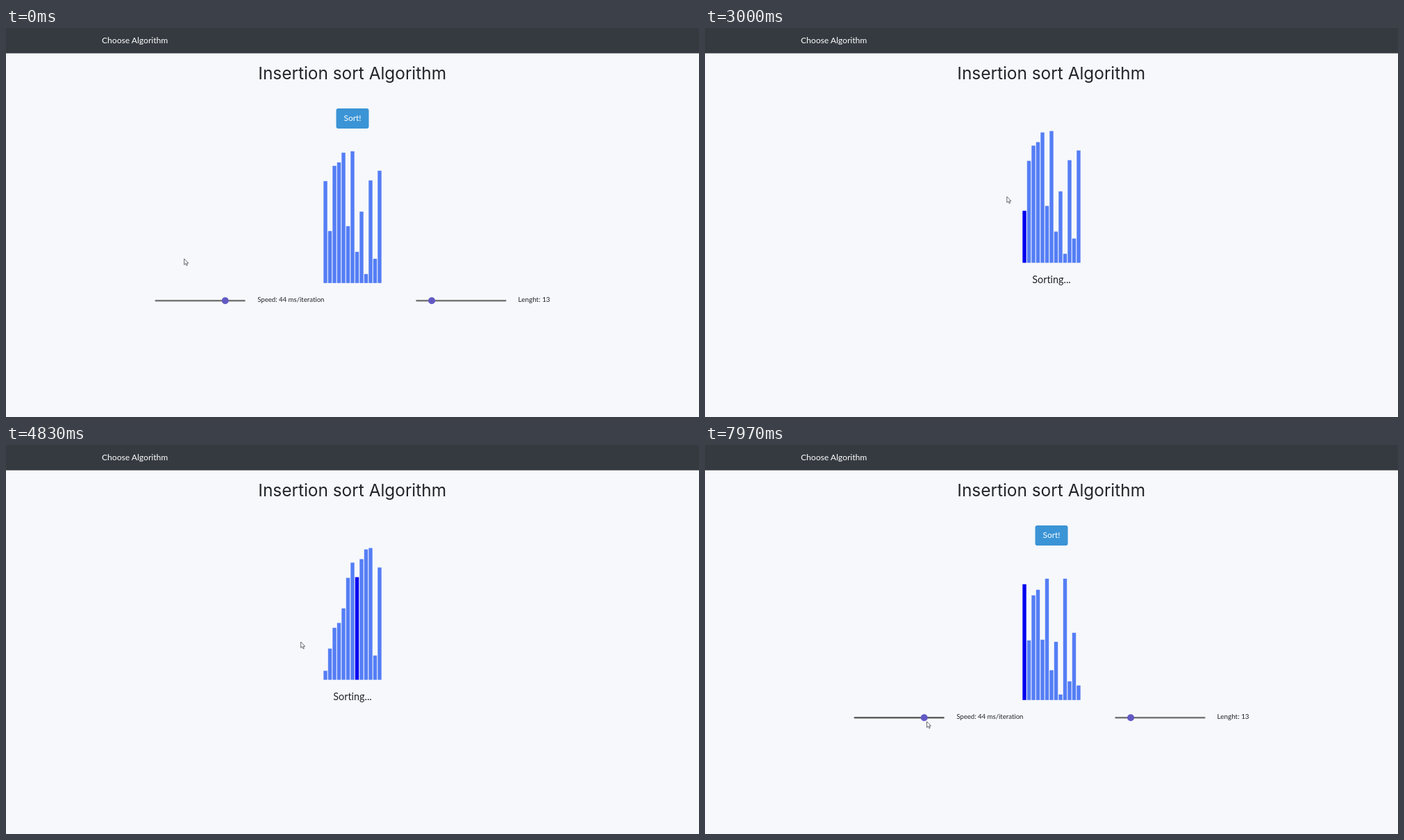
An HTML page that plays this animation: 998x561 px, repeating every 8000 ms.

```html
<!DOCTYPE html>
<html lang="en">
<head>
<meta charset="utf-8">
<title>Insertion sort</title>
<style>
  html, body { margin: 0; width: 100%; height: 100%; overflow: hidden; background: #f6f8fb; }
  svg { display: block; width: 998px; height: 561px; }
  text { font-family: Lato, "Open Sans", sans-serif; font-variant-ligatures: none; fill: #212529; }
  .title { font-family: Inter, "Open Sans", sans-serif; font-size: 24.4px; }
  .mid { text-anchor: middle; }
  .light { fill: #fff; }
</style>
</head>
<body>
<svg viewBox="0 0 998 561">
  <defs>
    <g id="slider">
      <rect y="-1.2" width="130.2" height="2.4" rx="1"/>
    </g>
    <circle id="thumb" r="5" fill="#6259c4"/>
  </defs>
  <rect width="998" height="36.5" fill="#343a40"/>
  <text class="light" x="138" y="22" font-size="12.1">Choose Algorithm</text>
  <text class="title mid" x="498.7" y="73.7">Insertion sort Algorithm</text>
  <g id="bars"></g>
  <g id="setup">
    <rect id="sortBtn" x="475.5" y="116" width="47" height="29" rx="3"/>
    <text class="mid light" x="499" y="134.2" font-size="11.9">Sort!</text>
    <use id="speed" href="#slider" x="214.5" y="393.3"/>
    <use href="#thumb" x="315.7" y="393.3"/>
    <text x="362.2" y="394.5" font-size="9.6">Speed: 44 ms/iteration</text>
    <use href="#slider" x="590.3" y="393.3" fill="#777"/>
    <use href="#thumb" x="613.1" y="393.3"/>
    <text x="737.6" y="394.5" font-size="9.9">Lenght: 13</text>
  </g>
  <text id="status" class="mid" x="499" y="368" font-size="14.4"></text>
  <g id="restart">
    <rect x="473" y="387" width="52" height="34.4" rx="6"/>
    <text class="mid light" x="499" y="407.6" font-size="9.5">Restart!</text>
  </g>
  <g id="cursor" stroke="#45454b" stroke-width=".8" stroke-linejoin="round" fill="#fff">
    <path id="arrow" d="M0 0V8.6L2 6.8L3.4 9.9L4.8 9.2L3.5 6.3H6Z"/>
    <path id="hand" d="M-.9 .8Q0 -.6 .9 .8V4.2Q1.9 3.6 2.5 4.5Q3.5 4 4 4.9Q5.3 4.7 5.3 6V8.6Q5.2 10.2 4.2 11.8H-.2Q-1.2 9.8 -2.9 7.6Q-2.9 6.3 -.9 7.6Z"/>
  </g>
</svg>
<script>
const $ = id => document.getElementById(id);
const LOOP = 8000;
const START = 2800, FIRST_SWAP = 2993, DONE = 6000, RESET = 6930;
const SWAP_MS = 45, KEEP_MS = 94, MOVE_MS = 250;

// Bar heights of the two shuffles
const first = [147, 75, 169, 174, 188, 82, 190, 45, 103, 13, 148, 35, 162];
const second = [167, 86, 151, 159, 87, 175, 43, 84, 8, 175, 27, 97, 21];

// Pointer moves: start time and where it comes to rest
const home = [256.6, 332.8];
const moves = [
  [750, 508.8, 138.2], [2740, 434.8, 243.2], [3050, 424.6, 284],
  [6020, 457.2, 335.5], [6370, 503, 402],
  [6940, 480, 431.5], [7280, 345, 401.5], [7620, 319.4, 398.8]
];

// Runs the insertion sort from the start and stops at time t
function sortAt(t) {
  const a = first.slice();
  let next = FIRST_SWAP, hot = 0;
  for (let i = 1; i < a.length; i++) {
    for (let j = i; j > 0; j--) {
      if (t < next) return { a, hot };
      if (a[j - 1] <= a[j]) {
        hot = j;
        next += KEEP_MS;
        break;
      }
      [a[j - 1], a[j]] = [a[j], a[j - 1]];
      hot = j - 1;
      next += SWAP_MS;
    }
  }
  return { a, hot: t < next ? hot : 0 };
}

function pointer(t) {
  let [x, y] = home;
  for (const [at, toX, toY] of moves) {
    const u = Math.min(1, Math.max(0, (t - at) / MOVE_MS));
    const e = u * u * (3 - 2 * u);
    x += (toX - x) * e;
    y += (toY - y) * e;
  }
  return [x, y];
}

const bars = first.map((_, i) => {
  const bar = document.createElementNS("http://www.w3.org/2000/svg", "rect");
  bar.setAttribute("x", 457.3 + 6.5 * i);
  bar.setAttribute("width", 5.4);
  return $("bars").appendChild(bar);
});

const show = (id, on) => $(id).setAttribute("display", on ? "inline" : "none");
const inside = (x, y, l, t, r, b) => x > l && x < r && y > t && y < b;

function draw(t) {
  const sorting = t >= START && t < RESET, done = sorting && t >= DONE;
  const { a, hot } = sorting ? sortAt(t)
    : t < START ? { a: first, hot: -1 } : { a: second, hot: 0 };

  const floor = sorting ? 338.6 : 367.8;
  bars.forEach((bar, i) => {
    bar.setAttribute("y", floor - a[i]);
    bar.setAttribute("height", a[i]);
    bar.setAttribute("fill", i === hot ? "#0000f0" : "#557ef5");
  });

  const [x, y] = pointer(t);
  const onSort = !sorting && inside(x, y, 475, 116, 523, 145);
  const onRestart = done && inside(x, y, 473, 387, 525, 421);
  const onSpeed = !sorting && inside(x, y, 214, 386, 345, 400);
  show("setup", !sorting);
  show("restart", done);
  show("arrow", !onSort && !onRestart);
  show("hand", onSort || onRestart);
  $("status").textContent = done ? "Done!" : sorting ? "Sorting..." : "";
  $("sortBtn").setAttribute("fill", onSort ? "#368ad1" : "#3b94d6");
  $("speed").setAttribute("fill", onSpeed ? "#606060" : "#777");
  $("cursor").setAttribute("transform", `translate(${x} ${y})`);
}

const origin = performance.now();
function tick() {
  draw((performance.now() - origin) % LOOP);
  requestAnimationFrame(tick);
}
tick();
</script>
</body>
</html>
```
